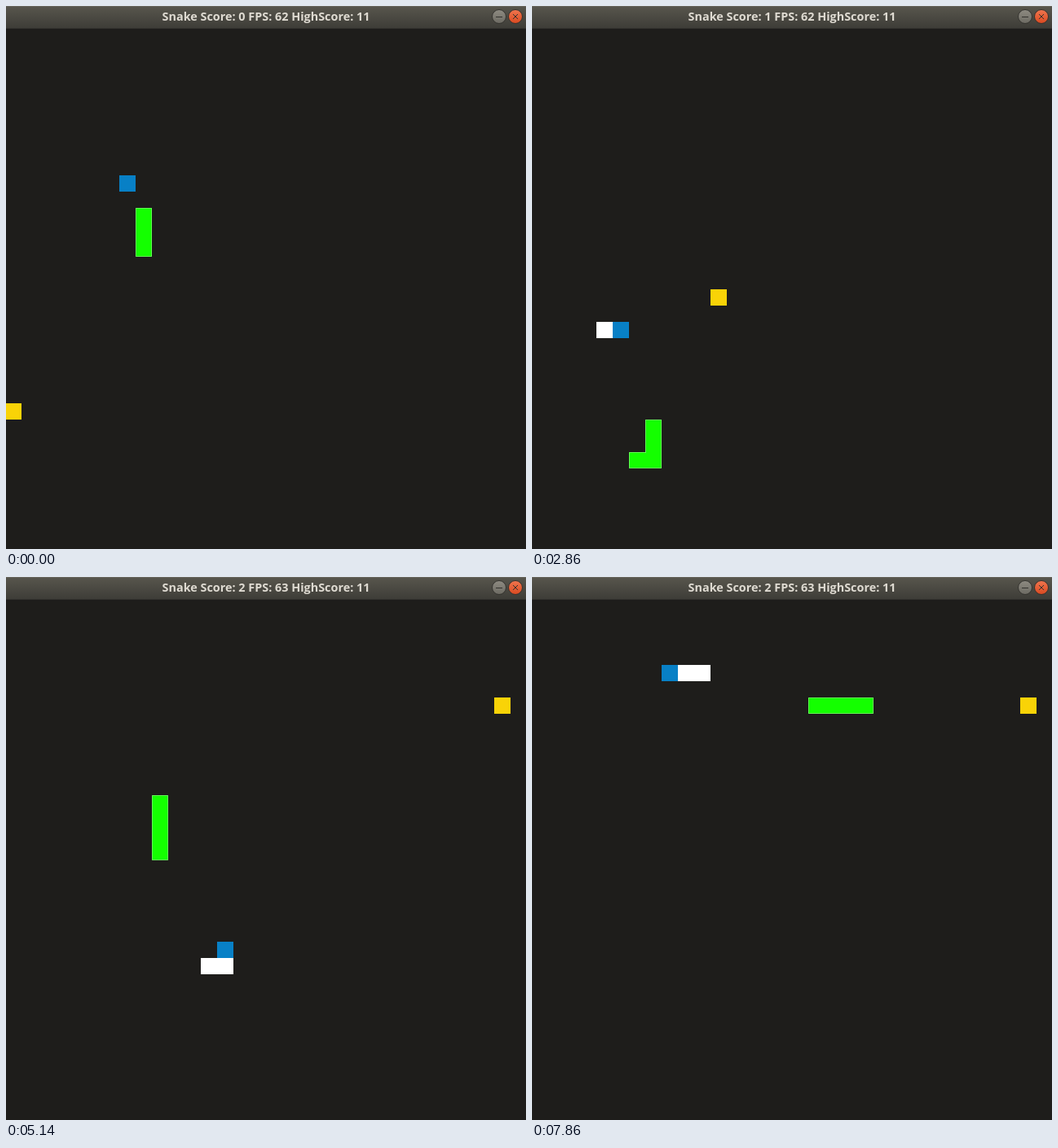
Recreate the animation shown at these times as an HTML page with a canvas. Size 638x667 px, loop 8000 ms.

```html
<!DOCTYPE html>
<html lang="en">
<head>
<meta charset="utf-8">
<title>Snake</title>
<style>
html, body { margin: 0; width: 100%; height: 100%; overflow: hidden; background: #1e1d1b; }
canvas { display: block; }
</style>
</head>
<body>
<canvas id="stage" width="638" height="667"></canvas>
<script>
const ctx = document.getElementById('stage').getContext('2d');
const LOOP = 8000, RATE = 7, CELL = 20, LEFT = -1, TOP = 28;
const STEPS = { U: [0, -1], D: [0, 1], L: [-1, 0], R: [1, 0] };

// Expands "D16 L7 ..." into the list of visited cells.
function walk(x, y, route) {
  const cells = [[x, y]];
  for (const leg of route.split(' ')) {
    const [dx, dy] = STEPS[leg[0]];
    for (let n = +leg.slice(1); n > 0; n--) cells.push([x += dx, y += dy]);
  }
  return cells;
}

const player = walk(7, 9, 'D16 L7 U7 R15 U3 L4 D7 R2 U4 L7 U15 R5 D1 L3');
const rival = walk(8, 11, 'D12 L2 D3 R1 U10 R2 U10 R11');
const RIVAL_HEAD = 2;

// Pairs of tick and number of moves made by the player.
const pace = [[0, 0], [8, 14], [12, 22], [20, 35], [30, 52], [42, 73], [48, 83], [55, 96]];
const foods = [[0, 23], [7, 26], [11, 16], [30, 6]];
const fpsChanges = [9, 16, 23, 37, 51];

function playerMoves(tick) {
  const k = Math.max(1, pace.findIndex(p => p[0] >= tick));
  const [t0, m0] = pace[k - 1], [t1, m1] = pace[k];
  return Math.floor(m0 + (m1 - m0) * (tick - t0) / (t1 - t0) + 1e-6);
}

function body(path, head, length) {
  return path.slice(Math.max(0, head - length + 1), head + 1);
}

function square([x, y], color) {
  ctx.fillStyle = color;
  ctx.fillRect(LEFT + x * CELL, TOP + y * CELL, CELL, CELL);
}

function drawRival(cells) {
  cells.forEach(c => square(c, '#62ff55'));
  ctx.fillStyle = '#14ff00';
  for (let i = 1; i < cells.length; i++) {
    const [ax, ay] = cells[i - 1], [bx, by] = cells[i];
    ctx.fillRect(LEFT + Math.min(ax, bx) * CELL + 1, TOP + Math.min(ay, by) * CELL + 1,
      Math.abs(ax - bx) * CELL + CELL - 2, Math.abs(ay - by) * CELL + CELL - 2);
  }
}

function shade(y0, y1, from, to) {
  const g = ctx.createLinearGradient(0, y0, 0, y1);
  g.addColorStop(0, from);
  g.addColorStop(1, to);
  return g;
}

function button(x, from, to, glyph) {
  ctx.beginPath();
  ctx.arc(x, 13, 8.5, 0, 7);
  ctx.fillStyle = shade(4, 22, from, to);
  ctx.fill();
  ctx.strokeStyle = '#33322e';
  ctx.lineWidth = 1;
  ctx.stroke();
  ctx.beginPath();
  for (const [x0, y0, x1, y1] of glyph) {
    ctx.moveTo(x + x0, 13 + y0);
    ctx.lineTo(x + x1, 13 + y1);
  }
  ctx.stroke();
}

function titleBar(text) {
  ctx.fillStyle = shade(0, 28, '#58564d', '#3d3c37');
  ctx.fillRect(0, 0, 638, 28);
  ctx.fillStyle = '#66645b';
  ctx.fillRect(0, 0, 638, 1);
  ctx.fillStyle = '#33322e';
  ctx.fillRect(0, 27, 638, 1);
  ctx.font = '700 14.4px "Open Sans", "Noto Sans", sans-serif';
  ctx.textAlign = 'center';
  ctx.fillStyle = '#dfdbd2';
  ctx.fillText(text, 319, 18);
  button(605, '#8f8c83', '#6b6961', [[-4, 0.5, 4, 0.5]]);
  button(625, '#f17750', '#d9481f', [[-3, -3, 3, 3], [3, -3, -3, 3]]);
}

function draw(time) {
  const t = Math.floor((time % LOOP) / 10) * 10 + 5;
  const tick = Math.floor(t * RATE / 1000);
  const moves = playerMoves(tick);
  const rivalMoves = Math.floor(tick * 0.893 + 0.75);
  const score = (moves >= 25) + (moves >= 53);
  const rivalAte = rivalMoves >= 16 ? 1 : 0;
  const fps = 62 + fpsChanges.filter(c => tick >= c).length % 2;

  ctx.fillStyle = '#1e1d1b';
  ctx.fillRect(0, 0, 638, 667);
  square(foods[score + rivalAte], '#f9d307');
  drawRival(body(rival, rivalMoves + RIVAL_HEAD, 3 + rivalAte));
  body(player, moves, score + 1).forEach(c => square(c, '#ffffff'));
  square(player[moves], '#0880c6');
  titleBar(`Snake Score: ${score} FPS: ${fps} HighScore: 11`);
}

const start = performance.now();
function loop() {
  draw(performance.now() - start);
  requestAnimationFrame(loop);
}
loop();
</script>
</body>
</html>
```
